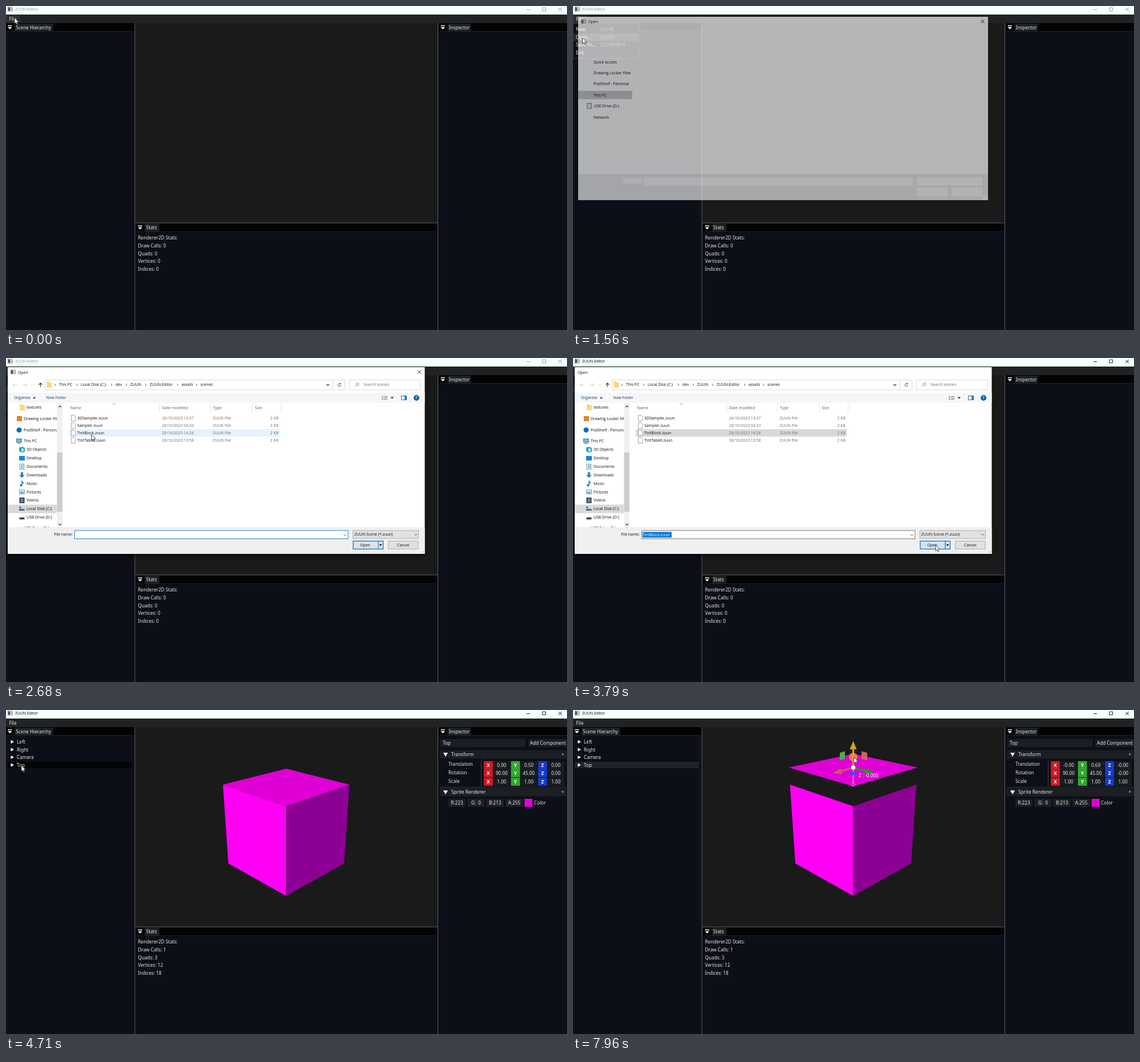
Animation of 984x569 px, one loop 8000 ms. Source, as an HTML page:

```html
<!DOCTYPE html>
<html lang="en">
<head>
<meta charset="utf-8">
<title>Scene editor</title>
<style>
html, body { margin: 0; width: 100%; height: 100%; overflow: hidden; background: #0c0f17; }
svg { display: block; width: 984px; height: 569px; }
text { white-space: pre; }
</style>
</head>
<body>
<svg id="stage" viewBox="0 0 984 569"></svg>
<script>
const LOOP = 8000;
const APP = 'ZUUN';
const UI = "'Noto Sans', sans-serif";
const SYS = "'Open Sans', 'Noto Sans', sans-serif";
const stage = document.getElementById('stage');

// Drawing helpers; text is placed by the middle of its capitals.
const rect = (x, y, w, h, fill, more = '') =>
  `<rect x="${x}" y="${y}" width="${w}" height="${h}" fill="${fill}" ${more}/>`;
const box = (x, y, w, h, fill, stroke, width = 1) =>
  rect(x, y, w, h, fill, `stroke="${stroke}" stroke-width="${width}"`);
const poly = (points, fill, more = '') => `<polygon points="${points}" fill="${fill}" ${more}/>`;
const path = (d, stroke, width = 1, fill = 'none') =>
  `<path d="${d}" stroke="${stroke}" stroke-width="${width}" fill="${fill}"/>`;
const circle = (x, y, r, fill, more = '') => `<circle cx="${x}" cy="${y}" r="${r}" fill="${fill}" ${more}/>`;
const write = (x, y, s, size, fill, font, more) =>
  `<text x="${x}" y="${(y + size * 0.36).toFixed(2)}" font-size="${size}" fill="${fill}" font-family="${font}" ${more}>${s}</text>`;
const label = (x, y, s, fill = '#e6e7e8', more = '') => write(x, y, s, 8.2, fill, UI, more);
const sys = (x, y, s, fill = '#111', more = '') => write(x, y, s, 6.9, fill, SYS, more);
const MID = 'text-anchor="middle"';
const END = 'text-anchor="end"';

// Cursor legs: first change, last change, number of steps, destination.
const legs = [
  [460, 640, 3, 16, 52], [920, 1100, 3, 16.5, 56], [1830, 2320, 6, 150, 190],
  [2400, 2760, 5, 150, 128], [3220, 3700, 6, 636, 328.5], [3880, 3990, 2, 343, 396],
  [4070, 4170, 2, 340, 396], [4330, 4430, 2, 27, 97.5], [4800, 5290, 6, 351, 203],
  [5840, 6580, 9, 490, 101], [6680, 6940, 4, 495, 110], [7220, 7220, 1, 495, 117],
  [7400, 7960, 7, 492.5, 83]
];

function stepped(t, from, to, n) {
  if (t < from) return 0;
  if (t >= to) return 1;
  const k = Math.floor((t - from) / (to - from) * (n - 1) + 1e-6) + 1;
  const u = k / n;
  return u * u * (3 - 2 * u);
}

function cursorAt(t) {
  let x = 15, y = 21;
  for (const [from, to, n, tx, ty] of legs) {
    const u = stepped(t, from, to, n);
    x += (tx - x) * u;
    y += (ty - y) * u;
  }
  return { x, y };
}

const appIcon = (x, y) => box(x + .5, y + .5, 8, 7, '#fff', '#777', .8) +
  rect(x + 1, y + 1, 3.5, 6, '#555') + rect(x + 5, y + 2.5, 3, 3.5, '#bbb');

function titleBar(active) {
  const ink = active ? '#050505' : '#8d9492';
  return rect(0, 0, 984, 15, '#f5fffd') + appIcon(3, 1.5) + sys(16, 6, APP + ' Editor', ink) +
    path('M913 6.5h6M941 3h5.5v5.5h-5.5zM969 3l6 6M975 3l-6 6', active ? '#111' : '#8d9492', .9);
}

const tab = (x, y, w, panelWidth, name) =>
  rect(x, y, panelWidth, 14, '#020305') + rect(x, y + 14, panelWidth, 1, '#1c1f24') +
  rect(x + 15, y + 1, w, 14, '#1d2024', 'rx="1.5"') +
  rect(x + 3, y + 4, 7.5, 1.4, '#fff') + poly(`${x + 3},${y + 7} ${x + 10.5},${y + 7} ${x + 6.75},${y + 11}`, '#fff') +
  label(x + 17.2, y + 8, name);

function panels(fileHot, loaded) {
  const stats = ['Renderer2D Stats:', 'Draw Calls: ' + (loaded ? 1 : 0), 'Quads: ' + (loaded ? 3 : 0),
    'Vertices: ' + (loaded ? 12 : 0), 'Indices: ' + (loaded ? 18 : 0)];
  return rect(0, 0, 984, 569, '#0c0f17') + rect(0, 15, 984, 15, '#202223') +
    (fileHot ? rect(0, 16, 25, 14, '#2d3032') : '') + label(5.5, 23, 'File') +
    rect(226, 30, 531, 351, '#1a1a1a') +
    tab(0, 30, 67.5, 225.5, 'Scene Hierarchy') + tab(759.5, 30, 41, 224.5, 'Inspector') +
    tab(228.5, 381.5, 25.5, 528, 'Stats') +
    rect(225.5, 30, 1, 539, '#5a5a68') + rect(757, 30, 1, 539, '#5a5a68') + rect(226, 380.5, 531, 1, '#5a5a68') +
    stats.map((s, i) => label(231.5, 407.5 + i * 13.6, s)).join('');
}

function menu(hot) {
  const items = [['New', 'Ctrl+N'], ['Open...', 'Ctrl+O'], ['Save As...', 'Ctrl+Shift+S'], ['Exit', '']];
  return box(.5, 30.5, 116.5, 61.5, '#0d0f14', '#33353d') + items.map(([name, keys], i) => {
    const y = 41 + i * 13.6;
    return (i === hot ? rect(1, y - 6.5, 113, 13.3, '#26292d') : '') + label(5, y, name) + label(47, y, keys, '#80838a');
  }).join('');
}

function hierarchy(rowFill) {
  return (rowFill ? rect(3, 91, 218, 11, rowFill) : '') + ['Left', 'Right', 'Camera', 'Top'].map((name, i) => {
    const y = 56 + i * 13.6;
    return poly(`8.5,${y - 3.3} 14,${y - .2} 8.5,${y + 2.9}`, '#fff') + label(19, y, name);
  }).join('');
}

const section = (y, name) => rect(761, y - 7.5, 222, 15, '#1b1e22') +
  poly(`767,${y - 3} 775,${y - 3} 771,${y + 4}`, '#fff') + label(781, y, name) + label(976.5, y, '+', '#ddd', MID);

function inspector(lift, dragged) {
  const zero = dragged ? '-0.00' : '0.00';
  const rows = [['Translation', zero, (.5 + .19 * lift).toFixed(2), zero],
    ['Rotation', '90.00', '45.00', zero], ['Scale', '1.00', '1.00', '1.00']];
  const axes = [['X', '#c81c26'], ['Y', '#31a830'], ['Z', '#1a3bc6']];
  const colour = [['R:223', 776, 30], ['G:  0', 809.5, 30], ['B:213', 842.5, 30.5], ['A:255', 876, 31]];
  return rect(762, 51, 149, 14, '#1b1e22') + label(766, 58, 'Top') +
    rect(916, 51, 68, 14, '#1b1e22') + label(919, 58, 'Add Component') +
    section(78, 'Transform') + rect(833, 88, 1, 46, '#40414b') +
    rows.map(([name, ...values], r) => {
      const y = [97, 111, 126][r];
      return label(776, y - (r ? .5 : 1.8), name) + axes.map(([axis, fill], i) => {
        const x = 838 + i * 47.6;
        return rect(x, y - 7.2, 16, 14.3, fill) + label(x + 8, y, axis, '#fff', MID + ' font-weight="700"') +
          rect(x + 16.8, y - 7.2, 29.4, 14.3, '#191c20') + label(x + 31.4, y, values[i], undefined, MID);
      }).join('');
    }).join('') +
    rect(761, 135, 222, 1, '#30323a') + section(144.3, 'Sprite Renderer') +
    colour.map(([s, x, w]) => rect(x, 156, w, 14, '#1d2024') + label(x + w / 2, 162.8, s, undefined, MID)).join('') +
    rect(909.5, 156, 14, 14, '#df00d5') + label(926, 162.8, 'Color');
}

function cube(lift) {
  const w = 111 + 2 * lift;
  const mid = 131 - 30 * lift;
  return poly('380.5,131 491.5,169 491.5,326.5 390,269.5', '#ff00f5') +
    poly('602.5,131 491.5,169 491.5,326.5 593,269.5', '#8d0094') +
    poly(`491.5,${103 - 26 * lift} ${491.5 + w},${mid} 491.5,${169 - 35 * lift} ${491.5 - w},${mid}`, '#df00d5');
}

function gizmo(lift, hot, dragging) {
  const y = 131 - 30 * lift;
  const up = hot ? '#d2a41c' : '#2f3fcb';
  const trail = dragging
    ? path(`M491.5 128V${y}`, 'rgba(255,255,255,.55)', 1.6) + circle(491.5, 131, 2.8, 'none', 'stroke="#e68ae6" stroke-width="1"')
    : '';
  const arrow = (line, head, fill) => path(line, fill, 3) + poly(head, fill);
  return trail + `<g transform="translate(491.5 ${y})">` +
    arrow('M0 0L-22 6.5', '-36,10 -22,1.5 -19,11.5', '#cd596c') +
    arrow('M0 0L22 6.5', '36.5,10 22.5,1.5 19.5,11.5', '#16a018') +
    arrow('M0 0V-32', '0,-46.5 -6,-32 6,-32', up) +
    poly('-9.5,10 0,7 9.5,10 0,13.5', '#4050d8') +
    poly('-23.5,-26 -14.5,-28.5 -14.5,-15 -23.5,-12.5', '#4cae4a') +
    poly('14.5,-28.5 24.5,-26 24.5,-12.5 14.5,-15', '#d65e6a') +
    circle(0, 0, 3.8, '#fff') + '</g>' +
    (dragging ? label(501, y + 14, 'Z : -0.000', '#fff') : '');
}

function dialogGhost() {
  const places = ['Quick access', 'Drawing Locker Files', 'PodShelf - Personal', 'This PC', 'USB Drive (D:)', 'Network'];
  return '<g opacity=".68">' + rect(9, 19, 719, 322, '#fff') + rect(9, 295, 719, 46, '#ececee') +
    rect(9, 149, 95, 14.5, '#cacaca') + appIcon(14, 23) + sys(26.5, 27.5, 'Open') +
    path('M715.5 24l6 6M721.5 24l-6 6', '#111') +
    box(25, 171, 7, 9, '#eee', '#444', .8) +
    places.map((s, i) => sys(36, 98.2 + i * 19.4, s)).join('') +
    [[88, 303, 33, 9], [124, 301, 472, 14], [603, 301, 115, 14], [603, 319, 54, 15], [664, 319, 54, 15], [718, 331, 10, 10]]
      .map(([x, y, w, h]) => rect(x, y, w, h, '#fbfbfb')).join('') + '</g>';
}

const folder = (x, y) => rect(x, y - 5, 5, 3, '#e8b83f') + rect(x, y - 4, 9, 9, '#ffd977');

function sideList() {
  const blue = '#1688d8';
  const places = [
    ['textures', 87, y => folder(24, y)],
    ['Drawing Locker Files', 106.5, y => rect(19, y - 4.5, 9, 9, '#e0862b'), 31],
    ['PodShelf - Personal', 126.5, y => circle(23, y, 4.5, '#0f6cbd'), 31],
    ['This PC', 146, y => box(18.5, y - 4, 9, 6, '#62bdf0', '#55707f') + rect(20, y + 3.5, 6, 1.2, '#55707f'), 31],
    ['3D Objects', 161, y => poly(`23,${y - 4} 29,${y - 5} 33,${y - 3} 33,${y + 4} 28,${y + 5} 23,${y + 3}`, '#2ba5c9') + rect(27, y - 2, 4, 5, '#c6eef7')],
    ['Desktop', 176, y => rect(23, y - 4, 10, 8, blue)],
    ['Documents', 190.7, y => box(24, y - 4.5, 7.5, 9, '#fff', '#6c8ba5') + path(`M26 ${y - 2}h4M26 ${y}h4M26 ${y + 2}h4`, blue)],
    ['Downloads', 205.6, y => poly(`26,${y - 5} 30,${y - 5} 30,${y} 33,${y} 28,${y + 5} 23,${y} 26,${y}`, '#2183dc')],
    ['Music', 220.4, y => circle(26.5, y + 3, 2.2, blue) + path(`M28 ${y + 3}V${y - 5}Q29 ${y - 2} 31 ${y}`, blue, 1.5)],
    ['Pictures', 235.3, y => box(23.5, y - 3.5, 9, 7, '#dceefa', '#8394a0') + rect(25, y, 6, 2, '#49829f')],
    ['Videos', 250, y => rect(23.5, y - 5, 9, 10, '#37414f') + rect(25.5, y - 3.5, 5, 7, '#6b7fae')],
    ['Local Disk (C:)', 265, y => rect(23, y, 9.5, 3, '#56626b') + rect(23, y - 4, 3.5, 3, blue)],
    ['USB Drive (D:)', 280, y => rect(23.5, y, 9, 3.5, '#444')],
    ['USB Drive (D:)', 299, () => '', 31]
  ];
  return '<clipPath id="side"><rect x="3" y="79" width="86" height="218"/></clipPath><g clip-path="url(#side)">' +
    rect(3, 257.5, 86, 15, '#d9d9d9') +
    places.map(([s, y, icon, x = 36]) => icon(y) + sys(x, y, s)).join('') + '</g>' +
    rect(89.5, 80, 9.5, 217, '#f0f0f0') + rect(89.5, 166, 9.5, 104, '#cdcdcd') +
    path('M92 86.5l2.5-2.5 2.5 2.5M92 291l2.5 2.5 2.5-2.5', '#444', 1.1);
}

function fileList(rowFill) {
  const files = [['3DSampler', '13:37'], ['Sampler', '04:33'], ['TintBlock', '16:26'], ['TintTablet', '13:58']];
  const heads = [['Name', 112.5], ['Date modified', 273.5], ['Type', 363], ['Size', 436.5]];
  return heads.map(([s, x]) => sys(x, 88, s, '#4c607a')).join('') +
    path('M269.5 80v16M358.5 80v16M432.5 80v16M482.5 80v16', '#e5e5e5') +
    path('M187 82l2.5-2 2.5 2', '#777', .8) +
    (rowFill ? rect(110.5, 125, 369.5, 13, rowFill) : '') +
    files.map(([name, time], i) => {
      const y = 105.5 + i * 13;
      return path(`M114.5 ${y - 5}h5l2.5 2.5v7.5h-7.5z`, '#8b8b8b', .8, '#fff') + sys(125, y, name + '.zuun') +
        sys(273.5, y, '26/10/2023 ' + time, '#6d6d6d') + sys(362.5, y, APP + ' File', '#6d6d6d') + sys(478, y, '2 KB', '#6d6d6d', END);
    }).join('');
}

function dialog(t, cursor) {
  const picked = t >= 2860, pressed = t >= 3700, closing = t >= 3790;
  const overRow = cursor.y > 125 && cursor.y < 138 && cursor.x > 110;
  const overOpen = cursor.x > 608 && cursor.y > 321;
  const rowFill = pressed ? '#d9d9d9' : picked ? '#cce8ff' : overRow ? '#e5f3ff' : '';
  const crumbs = [['This PC', 93], ['Local Disk (C:)', 131], ['dev', 192], [APP, 218], [APP + '-Editor', 252], ['assets', 308], ['scenes', 341]];
  const openFill = pressed ? '#cce4f7' : overOpen ? '#e5f1fb' : '#e1e1e1';
  const openEdge = pressed ? '#005499' : '#0078d7';
  const caret = t < 2320 && Math.floor((t - 1650) / 530) % 2 === 0;
  return rect(3, 16, 731.5, 328, '#fff', 'style="filter:drop-shadow(0 3px 4px #0008)"') +
    rect(3, 15, 731.5, 1, '#111') +
    (closing ? '' : appIcon(8, 20.5) + path('M722 21.5l6 6M728 21.5l-6 6', '#222')) +
    sys(closing ? 8 : 21, 25.3, 'Open') +
    path('M19 47h-7m3-3l-3 3 3 3M29.5 47h7m-3-3l3 3-3 3M45.5 46.5l2 1.5 2-1.5', '#ccc') +
    path('M60.5 51v-7m-3 3l3-3 3 3', '#333', 1.1) +
    box(68.5, 38.5, 505, 17.5, '#fff', '#d9d9d9') + box(573.5, 38.5, 21, 17.5, '#fff', '#d9d9d9') +
    box(602.5, 38.5, 124.5, 17.5, '#fff', '#d9d9d9') + folder(71.5, 47) +
    crumbs.map(([s, x]) => sys(x, 47, s) + path(`M${x - 7.7} 45l1.7 2-1.7 2`, '#555', .9)).join('') +
    path('M562 46l2.5 2.5 2.5-2.5', '#333', 1.1) + path('M586 45a2.6 2.6 0 1 0 1.4 2.4M587 43.8v1.8h-2', '#444', .9) +
    circle(616.5, 46, 2.4, 'none', 'stroke="#777" stroke-width=".8"') + path('M614.8 47.8l-3 3', '#777', .8) +
    sys(627, 47, 'Search scenes', '#6d6d6d') +
    rect(3, 61, 731.5, 18, '#f5f6f7') + sys(14, 70, 'Organize', '#1e395b') + poly('47,69 52,69 49.5,72', '#1e395b') +
    sys(70.5, 70, 'New folder', '#1e395b') +
    path('M659 67.5h3m1 0h6M659 70h3m1 0h6M659 72.5h3m1 0h6', '#777') + poly('674.5,68.5 680,68.5 677.2,71.7', '#333') +
    box(693.5, 66.5, 9, 7, '#fff', '#466d91') + rect(699, 67, 3.5, 6, '#1b87d5') +
    circle(720, 70, 5, '#0b64ad') + sys(720, 70, '?', '#fff', MID + ' font-weight="700"') +
    sideList() + fileList(rowFill) +
    rect(3, 297, 731.5, 47, '#f0f0f0') + sys(117, 310, 'File name:', '#111', END) +
    box(120.5, 303, 479.5, 14.5, '#fff', picked ? '#7a7a7a' : '#2a82c9') +
    (pressed ? rect(122, 305.5, 51, 10, '#0078d7') : '') +
    (picked ? sys(122.3, 310.5, 'TintBlock.zuun', pressed ? '#fff' : '#111') : caret ? rect(122.3, 306, .9, 9, '#111') : '') +
    path('M592 309.5l2.5 2.5 2.5-2.5', '#555') +
    box(608.5, 303, 115, 14, '#e1e1e1', '#adadad') + sys(611, 310, APP + ' Scene (*.zuun)') + path('M716 309l2.5 2.5 2.5-2.5', '#555') +
    box(609, 321.5, 52.5, 14, openFill, openEdge, pressed ? 1 : 1.3) + rect(652.5, 322, 1, 13, openEdge) +
    sys(630, 328.5, 'Open', '#111', MID) + poly('654.5,327 659.5,327 657,330.5', '#222') +
    box(670.5, 321.5, 52.5, 14, '#e1e1e1', '#adadad') + sys(696.7, 328.5, 'Cancel', '#111', MID) +
    path('M729 342.5l4-4M732 342.5l1-1', '#bbb');
}

const pointer = ({ x, y }) => `<path transform="translate(${x.toFixed(2)} ${y.toFixed(2)})" ` +
  'd="M0 0V10.3L2.4 8.1 4 11.8 5.7 11.1 4.1 7.5H7.4Z" fill="#fff" stroke="#111" stroke-width=".7"/>';

function scene(t) {
  const cursor = cursorAt(t);
  const loaded = t >= 3880, menuOpen = t >= 80 && !loaded;
  const selected = t >= 4710, dragging = t >= 7400;
  const lift = stepped(t, 7400, 7960, 7);
  const active = (t >= 80 && t < 1100) || t >= 3790;
  const rowFill = t >= 4800 ? '#202327' : selected ? '#030406' : t >= 4430 ? '#25282c' : '';
  const hotItem = t >= 1100 ? 1 : Math.floor((cursor.y - 34.5) / 13.6);
  let out = panels(!loaded, loaded) + titleBar(active);
  if (loaded) out += hierarchy(rowFill) + cube(lift);
  if (selected) out += inspector(lift, dragging);
  if (t >= 5470) out += gizmo(lift, t >= 6480, dragging);
  if (menuOpen) out += menu(hotItem);
  if (t >= 1560 && t < 1650) out += dialogGhost();
  if (t >= 1650 && !loaded) out += dialog(t, cursor);
  if (dragging) out += circle(cursor.x - 1, cursor.y - .5, 7.5, '#ff9a3c', 'opacity=".75"');
  return out + pointer(cursor);
}

let shown = '';
const start = performance.now();
function frame() {
  const next = scene((performance.now() - start) % LOOP);
  if (next !== shown) stage.innerHTML = shown = next;
  requestAnimationFrame(frame);
}
frame();
</script>
</body>
</html>
```
